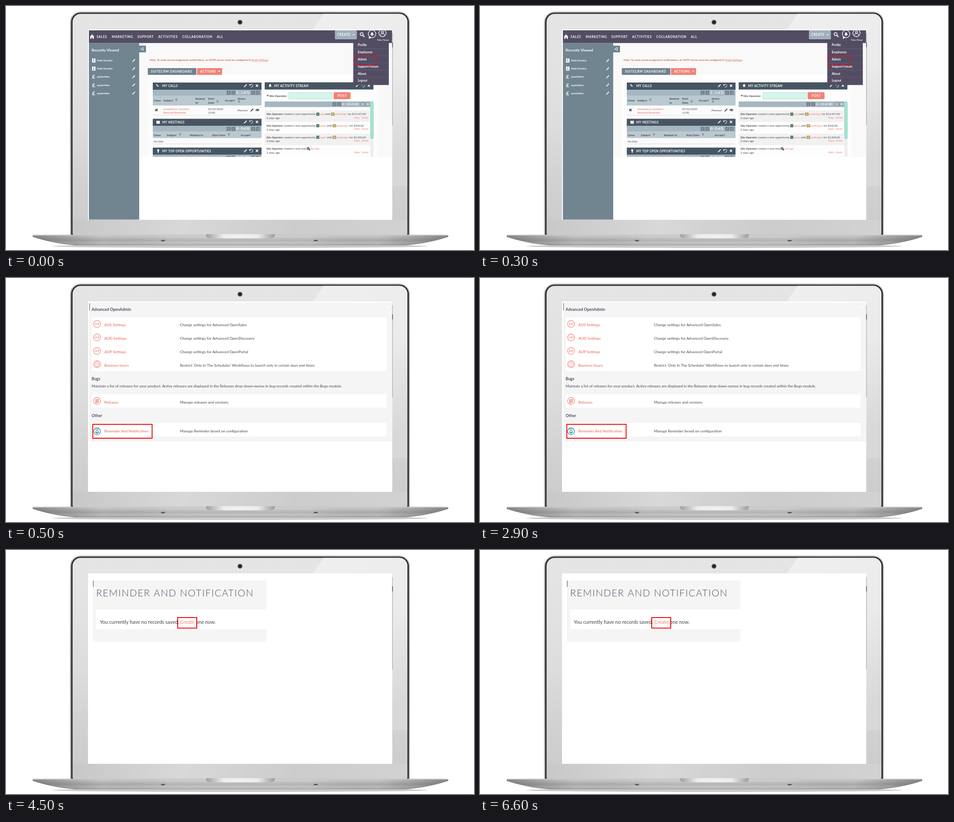
An HTML page with a canvas that plays this animation: 1033 by 542 pixels, repeating every 8 s.

```html
<!DOCTYPE html>
<html lang="en">
<head>
<meta charset="utf-8">
<title>Reminder and notification setup</title>
<style>
html, body { margin: 0; width: 100%; height: 100%; overflow: hidden; background: #fff; }
canvas { display: block; }
</style>
</head>
<body>
<canvas id="stage" width="1033" height="542"></canvas>
<script>
const ctx = document.getElementById('stage').getContext('2d');
const PURPLE = '#534d64', SLATE = '#475563', SIDE = '#718590', MIST = '#a6b7c1',
  CORAL = '#f08377', PALE = '#f6f6f6', INK = '#45414f', RED = '#f5070d';

function rect(x0, y0, x1, y1, color) {
  ctx.fillStyle = color;
  ctx.fillRect(x0, y0, x1 - x0, y1 - y0);
}

function frame(x0, y0, x1, y1, color, width) {
  ctx.strokeStyle = color;
  ctx.lineWidth = width;
  ctx.strokeRect(x0, y0, x1 - x0, y1 - y0);
}

function round(x0, y0, x1, y1, r, color) {
  ctx.fillStyle = color;
  ctx.beginPath();
  ctx.roundRect(x0, y0, x1 - x0, y1 - y0, r);
  ctx.fill();
}

// y is the middle of the capitals
function text(str, x, y, size, color = INK, style = '400', spacing = 0) {
  ctx.font = `${style} ${size}px Lato, sans-serif`;
  ctx.letterSpacing = spacing + 'px';
  ctx.fillStyle = color;
  ctx.fillText(str, x, y + size * 0.35);
  return x + ctx.measureText(str).width;
}
const bold = (str, x, y, size, color) => text(str, x, y, size, color, '700');
const label = (str, x, y, size = 6.8, spacing = 0.75) => text(str, x, y, size, '#fff', '700', spacing);

function line(points, color, width = 1) {
  ctx.strokeStyle = color;
  ctx.lineWidth = width;
  ctx.beginPath();
  points.forEach(([x, y]) => ctx.lineTo(x, y));
  ctx.stroke();
}

function shape(points, color) {
  ctx.fillStyle = color;
  ctx.beginPath();
  points.forEach(([x, y]) => ctx.lineTo(x, y));
  ctx.fill();
}

function ring(x, y, r, color, width = 1, from = 0, to = Math.PI * 2) {
  ctx.strokeStyle = color;
  ctx.lineWidth = width;
  ctx.beginPath();
  ctx.arc(x, y, r, from, to);
  ctx.stroke();
}

function dot(x, y, rx, ry, color) {
  ctx.fillStyle = color;
  ctx.beginPath();
  ctx.ellipse(x, y, rx, ry, 0, 0, Math.PI * 2);
  ctx.fill();
}

function gradient(x0, y0, x1, y1, ...colors) {
  const g = ctx.createLinearGradient(x0, y0, x1, y1);
  colors.forEach((c, i) => g.addColorStop(i / (colors.length - 1), c));
  return g;
}

// ---- icons ----
const caret = (x, y) => shape([[x - 2.5, y - 1.3], [x + 2.5, y - 1.3], [x, y + 1.5]], '#fff');

function pencil(x, y, color = '#fff') {
  line([[x - 2, y + 2], [x + 2.7, y - 2.7]], color, 1.8);
  shape([[x - 3.5, y + 3.5], [x - 3, y + 1.2], [x - 1.2, y + 3]], color);
}

function cross(x, y, color = '#fff', r = 2.3) {
  line([[x - r, y - r], [x + r, y + r]], color, 1.7);
  line([[x + r, y - r], [x - r, y + r]], color, 1.7);
}

function tools(x, y) {
  pencil(x, y);
  ring(x + 13, y, 3.3, '#fff', 1, -2.5, 2);
  shape([[x + 8.5, y - 3.5], [x + 12, y - 1], [x + 8.5, y]], '#fff');
  cross(x + 25.5, y);
}

function sorter(x, y) {
  shape([[x - 3, y - 0.6], [x, y - 3], [x + 3, y - 0.6]], '#7b8993');
  shape([[x - 3, y + 0.6], [x, y + 3], [x + 3, y + 0.6]], '#7b8993');
}

function bell(x, y, s, color) {
  ctx.fillStyle = color;
  ctx.beginPath();
  ctx.moveTo(x - s, y + s * 0.6);
  ctx.quadraticCurveTo(x - s * 0.5, y, x - s * 0.5, y - s * 0.4);
  ctx.arc(x, y - s * 0.4, s * 0.5, Math.PI, 0);
  ctx.quadraticCurveTo(x + s * 0.5, y, x + s, y + s * 0.6);
  ctx.fill();
  dot(x, y + s * 0.85, s * 0.3, s * 0.25, color);
}

function magnifier(x, y, r, color) {
  ring(x, y, r, color, 1.5);
  line([[x + r * 0.7, y + r * 0.7], [x + r * 2, y + r * 2]], color, 2);
}

function pagerButton(x, y, dir, end) {
  rect(x, y, x + 9, y + 9, dir === 0 ? '#71828e' : '#8fa2ae');
  const s = dir || -1;
  line([[x + 4.5 - s * 1.5, y + 2], [x + 4.5 + s * 1.5, y + 4.5], [x + 4.5 - s * 1.5, y + 7]],
    dir ? '#fff' : '#98a8b2', 1.2);
  if (end) line([[x + 7.5, y + 2], [x + 7.5, y + 7]], dir ? '#fff' : '#98a8b2', 1);
}

// ---- laptop ----
function drawLaptop() {
  rect(0, 0, 1033, 542, '#fff');
  round(141, 12, 891.5, 512, [24, 24, 0, 0], gradient(0, 12, 0, 508, '#c9c9c9', '#b7b7b7', '#cfcfcf'));
  round(143.5, 14.5, 889.5, 512, [21, 21, 3, 3], '#343434');
  round(147, 17.5, 886, 508, [18, 18, 3, 3],
    gradient(0, 17, 0, 508, '#e5e5e5', '#e2e2e2', '#dddddd', '#d2d2d2', '#cbcbcb'));

  ctx.save();
  ctx.beginPath();
  ctx.roundRect(147, 17.5, 739, 490.5, [18, 18, 3, 3]);
  ctx.clip();
  shape([[701, 17], [886, 17], [886, 400], [440, 400]], gradient(700, 17, 886, 330, '#efefef', '#ebebeb', '#d8d8d8'));
  rect(148, 475, 886, 508, gradient(148, 0, 886, 0, '#c8c8c8', '#d8d8d8', '#cccccc', '#d2d2d2'));
  ctx.restore();

  dot(516.5, 36, 5.3, 5.3, '#4d4d4d');
  dot(516.5, 36, 3.3, 3.3, '#222');

  dot(516, 533.5, 414, 4, '#c9c9c9');
  ctx.fillStyle = gradient(0, 508, 0, 533, '#d2d2d2', '#bdbdbd', '#a9a9a9', '#bbbbbb', '#8d8d8d');
  ctx.beginPath();
  ctx.moveTo(59, 509);
  ctx.lineTo(976, 509);
  ctx.lineTo(976, 513);
  ctx.bezierCurveTo(950, 521, 920, 529, 882, 531.5);
  ctx.lineTo(153, 531.5);
  ctx.bezierCurveTo(115, 529, 85, 521, 59, 513);
  ctx.fill();
  ctx.fillStyle = gradient(59, 0, 976, 0, 'rgba(70,70,70,.5)', 'rgba(90,90,90,0)', 'rgba(255,255,255,.12)',
    'rgba(255,255,255,.15)', 'rgba(255,255,255,.12)', 'rgba(90,90,90,0)', 'rgba(70,70,70,.5)');
  ctx.fill();
  rect(60, 508, 975, 510, '#c5c5c5');
  round(441, 507, 594, 516, [0, 0, 9, 9], gradient(441, 0, 594, 0, '#9c9c9c', '#ececec', '#f2f2f2', '#ececec', '#9c9c9c'));
  for (const x of [346.5, 683.5]) dot(x, 521, 4.7, 1.6, '#505050');

  rect(181, 52, 852.5, 475, '#fff');
  rect(852.5, 60, 853.7, 265, '#a9a9a9');
  rect(852.5, 81, 854, 92, '#555');
}

// ---- dashboard ----
function drawNav() {
  rect(183, 54, 852, 82.5, PURPLE);
  shape([[185, 68.5], [190, 63], [195, 68.5], [193.8, 68.5], [193.8, 73], [191.3, 73], [191.3, 70],
    [188.7, 70], [188.7, 73], [186.2, 73], [186.2, 68.5]], '#fff');
  [['SALES', 200], ['MARKETING', 233.5], ['SUPPORT', 290], ['ACTIVITIES', 336],
    ['COLLABORATION', 389], ['ALL', 465.5]].forEach(([s, x]) => label(s, x, 69));
  round(726, 54, 774.5, 74, 2, '#a0b0bd');
  label('CREATE', 731, 64);
  caret(767.5, 64);
  magnifier(785, 62.5, 3.2, '#fff');
  ring(808, 62, 8.3, '#fff', 1.3);
  shape([[801, 67], [801, 73], [807, 70]], '#fff');
  bell(808, 62, 4, '#fff');
  ring(831, 60, 8, '#fff', 1.3);
  ring(831, 58, 2.3, '#fff', 1.2);
  ring(831, 65.5, 4.6, '#fff', 1.2, Math.PI, 0);
  ctx.save();
  ctx.beginPath();
  ctx.rect(818, 70, 27, 7);
  ctx.clip();
  bold('Site Operator', 819, 75.5, 6.2, '#fff');
  ctx.restore();
}

function drawSidebar() {
  rect(183, 82.5, 294, 474.5, SIDE);
  bold('Recently Viewed', 189, 98, 8.1, '#fff');
  for (let i = 0; i < 5; i++) {
    const y = 121 + i * 18.1, invoice = i < 2;
    if (invoice) {
      rect(190, y - 4.5, 197.5, y + 4.5, '#fff');
      bold('£', 191.8, y, 7, SIDE);
    } else bold('£', 190, y, 12, '#fff');
    bold(invoice ? 'Paid Invoice' : 'quotation', 201, y, 6.4, '#fff');
    pencil(282, y);
  }
  rect(294, 88, 309, 103, SIDE);
  ctx.lineJoin = 'miter';
  line([[303, 92.3], [297, 95.5], [303, 98.7], [303, 92.3]], '#fff', 1);
}

function panelHead(title, x0, x1, y, height = 16) {
  rect(x0, y, x1, y + height, SLATE);
  label(title, x0 + 21, y + height / 2, 6.6, 0.35);
  tools(x1 - 35.5, y + height / 2 - 1);
}

function pagerRow(y, count) {
  rect(324, y, 564, y + 13, MIST);
  [487, 497.5, 541, 551.5].forEach((x, i) => pagerButton(x, y + 2, 0, i === 3));
  if (count) bold(count, 507.5, y + 6.5, 6.5, '#fff');
}

const heads = (cells) => cells.forEach(([s, x, y]) => bold(s, x, y, 6.4, '#3f4653'));

function drawCalls() {
  panelHead('MY CALLS', 324, 564, 170);
  ring(336.5, 174.5, 3.6, '#fff', 1.8, 1.4, 3.4);
  pagerRow(186, '(1 - 1 of 1)');
  rect(324, 199, 564, 221, '#bac8d0');
  heads([['Close', 326, 210], ['Subject', 347.5, 210], ['Related', 418, 205.5], ['to', 418, 214.5],
    ['Start', 446, 205.5], ['Date', 446, 214.5], ['Accept?', 483, 210], ['Status', 511, 205.5]]);
  [[376, 208], [467, 212], [514.5, 212]].forEach(([x, y]) => sorter(x, y));
  rect(324, 221, 564, 242.5, '#fbfbfb');
  rect(324, 242, 564, 243, '#dedede');
  cross(332, 231, '#333', 2.5);
  bold('accountcccc Contract', 347.5, 228.5, 6, CORAL);
  bold('Renewal Reminder', 347.5, 237, 6, CORAL);
  text('02/26/2020', 446, 228.5, 6);
  text('12:00', 446, 237, 6);
  text('Planned', 511, 232, 6.2);
  pencil(543, 231, '#333');
  dot(555, 231, 4, 2.5, '#444');
  dot(555, 231, 2.5, 1.6, '#fff');
  dot(555, 231, 1.3, 1.3, '#333');
}

function drawMeetings() {
  panelHead('MY MEETINGS', 324, 564, 250.5);
  rect(332, 255, 339.5, 261.5, '#fff');
  pagerRow(266.5, '(0 - 0 of 0)');
  rect(324, 279.5, 564, 293.5, '#bac8d0');
  heads([['Close', 326, 287], ['Subject', 355, 287], ['Related to', 406, 287], ['Start Date', 455, 287], ['Accept?', 518, 287]]);
  sorter(384, 285);
  sorter(492, 285);
  rect(324, 293.5, 564, 306, '#fbfbfb');
  rect(324, 306, 564, 307, '#d5d5d5');
  text('No Data', 326, 300.5, 6.1, INK, 'italic 400');
  panelHead('MY TOP OPEN OPPORTUNITIES', 324, 564, 314.5);
  dot(336, 320.5, 2.3, 2.5, '#fff');
  rect(335, 322, 337, 326, '#fff');
  pagerRow(330.5, '(1 - 5 of 5)');
}

function folder(x, y) {
  rect(x, y - 2.5, x + 6.5, y + 3, '#e8c66a');
  frame(x + 0.5, y - 2.5, x + 6.5, y + 3, '#6b5a2a', 0.8);
}

function drawStream() {
  panelHead('MY ACTIVITY STREAM', 571, 811, 169.5);
  bell(583, 176.5, 3.5, '#fff');
  line([[575.8, 197.7], [577.8, 200], [579.8, 197.7]], INK, 1.2);
  bold('Site Operator', 581, 199.5, 6.4);
  rect(624, 192, 720.5, 207, '#d6f5ec');
  frame(624.5, 192.5, 720, 206.5, '#a9e4d3', 1);
  round(723, 191.5, 760.5, 207, 2, CORAL);
  label('POST', 732, 199.5);
  rect(571, 212, 804, 224.5, MIST);
  pagerButton(720.5, 213.5, 0);
  pagerButton(731, 213.5, 0);
  bold('(1 - 15 of 48)', 741, 218, 6.4, '#fff');
  pagerButton(782.5, 213.5, 1);
  pagerButton(792.5, 213.5, 1, true);

  const posts = [['opp', '$14,447.00'], ['opp2', '$100.00'], ['opp1', '$1,000.00'], null];
  posts.forEach((post, i) => {
    const y = 240 + i * 25.7;
    rect(571, y - 8, 804, y + 17.7, i % 2 ? '#fdfdfd' : '#f1f1f1');
    let x = bold('Site Operator ', 575, y, 6);
    if (post) {
      x = text('created a new opportunity ', x, y, 6.1);
      rect(x, y - 3, x + 6, y + 3.5, '#5d9b78');
      frame(x + 0.5, y - 2.5, x + 6, y + 3, '#33463c', 0.8);
      x = text(post[0], x + 7.5, y, 6.1, CORAL);
      x = text(' with ', x, y, 6.1);
      folder(x, y);
      x = text('paidledger', x + 7.5, y, 6.1, CORAL);
      text(' for ' + post[1], x, y, 6);
    } else {
      x = text('created a new lead ', x, y, 6.1);
      magnifier(x + 2.5, y - 0.5, 2, '#333');
      text('dot bgk', x + 7.5, y, 6.1, CORAL);
    }
    text('2 days ago', 575, y + 8.7, 6.4);
    text('Reply - Delete', 769, y + 8, 5, CORAL);
  });
  rect(804.5, 212, 811, 335, '#ededed');
  round(804.5, 212, 811, 295, 3, '#6fc7ad');
  round(805.5, 213, 810, 294, 2, '#a5e8d6');
}

function drawMenu() {
  rect(766.5, 77, 845, 175.5, PURPLE);
  ['Profile', 'Employees', 'Admin', 'Support Forum', 'About', 'Logout'].forEach((item, i) => {
    const y = 87 + i * 15.8;
    if (i) rect(767, y - 8.2, 845, y - 7.4, '#68627a');
    bold(item, 776.5, y, 6.8, '#fff');
  });
  frame(769, 110.5, 817.5, 131, '#e0101a', 1.5);
}

function drawDashboard() {
  drawNav();
  ctx.save();
  ctx.beginPath();
  ctx.rect(294, 82, 558, 253);
  ctx.clip();
  rect(294, 82.5, 852, 335, '#f9f9f9');
  const x = text('Note: To send record assignment notifications, an SMTP server must be configured in ', 317, 120, 6, '#c8322d');
  const end = bold('Email Settings', x, 120, 5.9, CORAL);
  rect(x, 122.8, end, 123.4, CORAL);
  text('.', end, 120, 6, '#c8322d');
  rect(313, 138, 420, 153, '#6f818d');
  text('SUITECRM DASHBOARD', 320, 145.5, 6.9, '#fff', '700', 0.65);
  rect(421.5, 138, 477, 153, CORAL);
  label('ACTIONS', 428.5, 145.5);
  caret(470.5, 145);
  rect(313, 153, 820, 335, '#fdfdfd');
  drawCalls();
  drawMeetings();
  drawStream();
  ctx.restore();
  drawSidebar();
  drawMenu();
}

// ---- admin page ----
function badge(y, code) {
  ring(201, y, 7.7, CORAL, 1.2);
  ctx.textAlign = 'center';
  bold(code, 201, y, 5, CORAL);
  ctx.textAlign = 'left';
}

function drawAdmin() {
  rect(184, 54.5, 852, 363, '#f5f5f5');
  rect(184, 56, 185, 72, '#555');
  shape([[839, 63], [847, 63], [843, 67]], '#fff');
  for (const [top, bottom] of [[87, 207], [258, 288.5], [322, 352.5]]) {
    rect(189, top, 840, bottom + 0.7, '#ebebeb');
    rect(189, top, 840, bottom, '#fff');
  }
  [['Advanced OpenAdmin', 70], ['Bugs', 224], ['Other', 306]].forEach(([s, y]) => bold(s, 189, y, 8.7, PURPLE));
  text('Maintain a list of releases for your product. Active releases are displayed in the Releases drop-down menus in bug records created within the Bugs module.', 189, 240, 8.2);
  [['AOS Settings', 104, 'Change settings for Advanced OpenSales'],
    ['AOD Settings', 134, 'Change settings for Advanced OpenDiscovery'],
    ['AOP Settings', 164, 'Change settings for Advanced OpenPortal'],
    ['Business hours', 194, "Restrict 'Only In The Scheduler' Workflows to launch only in certain days and times"],
    ['Releases', 276, 'Manage releases and versions'],
    ['Reminder And Notification', 340, 'Manage Reminder besed on configuration']
  ].forEach(([name, y, note]) => {
    bold(name, 217, y, 8.15, CORAL);
    text(note, 384, y, 8.2);
  });
  badge(102, 'AOS');
  badge(132, 'AOD');
  badge(162, 'AOP');
  badge(191.5, '');
  ring(201, 191.5, 5, CORAL, 1);
  line([[198.3, 189.5], [201, 192.2], [204, 190]], CORAL, 1);
  badge(273, '');
  for (const y of [270, 273, 276]) line([[197, y + 1], [200, y + 0.8], [205, y - 1]], CORAL, 1.8);
  ring(201, 340.5, 7.7, '#2f7f99', 1.2);
  bell(201, 341, 4.6, '#2f7f99');
  bell(201, 340.5, 2.5, '#fff');
  ring(201, 340, 5.7, '#2f7f99', 0.9, 3.5, 5.9);
  frame(191.5, 325, 322.5, 356, RED, 2);
}

// ---- empty list ----
function drawEmptyList() {
  rect(192, 68, 575, 204, '#f5f5f5');
  rect(192, 68, 193.2, 82, '#4b5d78');
  rect(199, 132, 575, 176, '#fff');
  text('REMINDER AND NOTIFICATION', 199, 95.5, 21.3, PURPLE, '300', 1.5);
  let x = text('You currently have no records saved. ', 207, 160.5, 10.9);
  x = text('Create', x, 160.5, 10.9, CORAL);
  text(' one now.', x, 160.5, 10.9);
  frame(379, 150, 421, 173.5, RED, 2);
}

function render(now) {
  const t = now % 8000;
  drawLaptop();
  if (t < 500) drawDashboard();
  else if (t < 4500) drawAdmin();
  else drawEmptyList();
}

function tick() {
  render(performance.now());
  requestAnimationFrame(tick);
}
tick();
</script>
</body>
</html>
```
